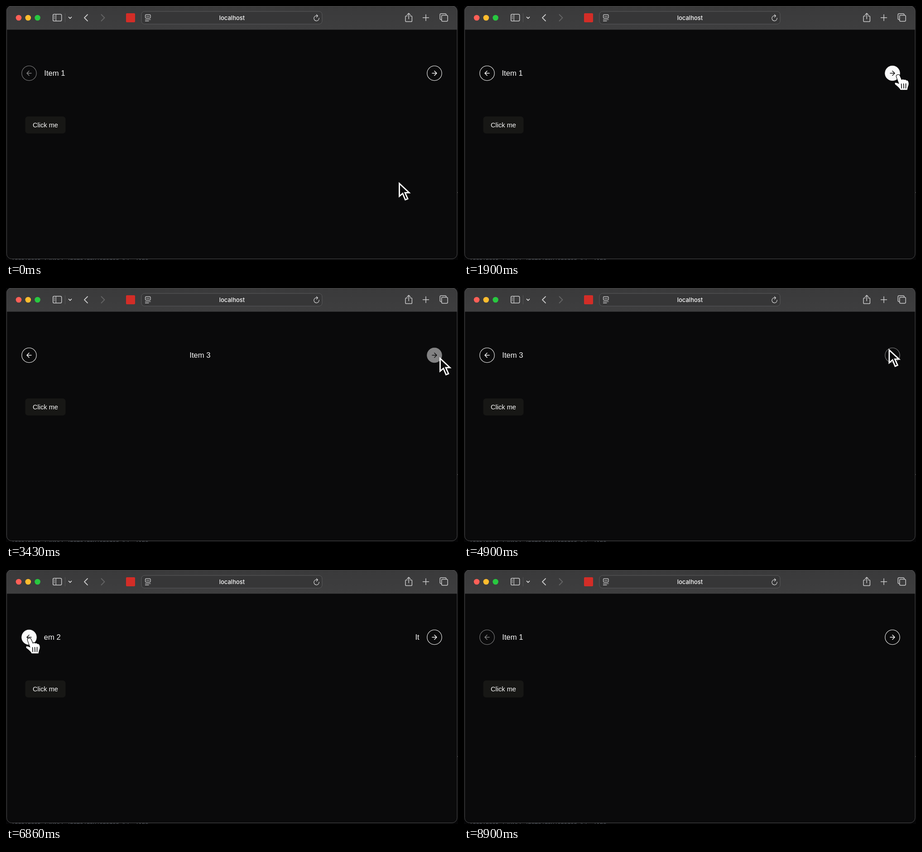
Write an HTML page that moves like this. It is 998 px wide and 561 px high and loops after 10 s.

```html
<!DOCTYPE html>
<html lang="en">
<head>
<meta charset="utf-8">
<title>Carousel</title>
<style>
  html, body { margin: 0; width: 100%; height: 100%; overflow: hidden; background: #050506; }
  svg { display: block; width: 998px; height: 561px; }
  text { font-family: "Liberation Sans", Arial, sans-serif; fill: #fafafa; }
  .icon { fill: none; stroke: #c9c9ca; stroke-width: 1.5; stroke-linecap: round; stroke-linejoin: round; }
  .item { font-size: 16.67px; }
</style>
</head>
<body>
<svg viewBox="0 0 998 561">
  <defs>
    <linearGradient id="bar" x2="0" y2="1">
      <stop stop-color="#3a3a3b"/><stop offset="1" stop-color="#3e3e3f"/>
    </linearGradient>
    <clipPath id="window"><rect x="1" y="-.5" width="995.5" height="559" rx="11"/></clipPath>
    <clipPath id="viewport"><rect x="84" y="130" width="829" height="40"/></clipPath>
  </defs>

  <!-- desktop behind the window -->
  <text x="12" y="566" font-size="12" style="font-family:'Liberation Mono',monospace;fill:#4b5058">localhost (2015) /home/dev/shader-12, line</text>
  <rect x="996.5" y="411" width="1.5" height="2" fill="#444"/>

  <g clip-path="url(#window)">
    <rect width="998" height="561" fill="#0a0a0b"/>
    <rect width="998" height="52.5" fill="url(#bar)"/>
    <rect y="52" width="998" height="1" fill="#1b1b1c"/>
  </g>
  <rect x="1.5" y="0" width="994.5" height="558.5" rx="11" fill="none" stroke="#4c4c4d"/>

  <!-- toolbar -->
  <circle cx="28" cy="26" r="6.3" fill="#ff5f57"/>
  <circle cx="48.8" cy="26" r="6.3" fill="#febc2e"/>
  <circle cx="69.6" cy="26" r="6.3" fill="#28c840"/>
  <path d="M130.5 16v20" stroke="#545455"/>
  <rect x="265" y="16" width="20" height="20" rx="2" fill="#d32d27"/>
  <rect x="299" y="12" width="399" height="28" rx="7" fill="#363637" stroke="#5b5b5c"/>
  <g class="icon">
    <rect x="103.7" y="18.2" width="19" height="15" rx="2.5"/>
    <path d="M110.3 18.5v15M106 22h2M106 25h2M106 28h2" stroke-width="1.2"/>
    <path d="M138.5 24.5l3 3 3-3" stroke="#e4e4e5" stroke-width="1.7"/>
    <path d="M180 19l-7 7 7 7" stroke-width="1.8"/>
    <path d="M210.5 19l7 7-7 7" stroke="#656566" stroke-width="1.8"/>
    <g stroke="#d8d8d9" stroke-width="1.2">
      <rect x="307.6" y="19.2" width="11.4" height="7.6" rx="1.8"/>
      <path d="M310 23h6.6M307.5 30h11.5M307.5 33.2h7.5"/>
      <path d="M688 22a5.7 5.7 0 1 0 3.2 4.6M685.5 18.8l3 3-3 3"/>
    </g>
    <path d="M886 22h-2.2q-1.8 0-1.8 1.8v9q0 1.8 1.8 1.8h10.8q1.8 0 1.8-1.8v-9q0-1.8-1.8-1.8h-2.2M889.2 28.5v-12M885.7 19.5l3.5-3.5 3.5 3.5"/>
    <path d="M920.5 25.7h13M927 19v13.4"/>
    <path d="M961.5 30h-1.2q-2 0-2-2v-9q0-2 2-2h9.5q2 0 2 2v1.3"/>
    <rect x="961.7" y="20.5" width="13.5" height="13.3" rx="2.2"/>
  </g>
  <text x="499" y="31.2" text-anchor="middle" font-size="13" font-weight="500" style="font-family:Inter,sans-serif">localhost</text>

  <!-- page -->
  <g id="items" clip-path="url(#viewport)"></g>
  <rect x="42.5" y="244" width="89" height="37.5" rx="6" fill="#171715"/>
  <text x="59" y="268.2" font-size="14.6">Click me</text>
  <g id="prev" transform="translate(51 148.5)">
    <circle r="16.2" stroke="#fafafa" stroke-width="1.1"/>
    <path class="icon" d="M5 0h-10M0-5l-5 5 5 5"/>
  </g>
  <g id="next" transform="translate(946 148.5)">
    <circle r="16.2" stroke="#fafafa" stroke-width="1.1"/>
    <path class="icon" d="M-5 0h10M0-5l5 5-5 5"/>
  </g>

  <g id="cursor">
    <path id="arrow" d="M1.5 4V32.3L8.8 26 14.6 40 20 37.7 14 24.3H23.2Z" fill="#0a0a0b" stroke="#fff" stroke-width="2.8"/>
    <g id="hand">
      <path d="M-.6 .4C2-1 4.4 0 5.6 2.6L9.4 11Q12 8.6 14.6 11Q17.4 9.6 19.6 12.4Q23 11.6 24.4 15.2Q26.6 21 23.4 27.4L22 34.4H6.4Q4.6 29.4-4.8 22.6Q-7.4 19.4-5 17.6Q-3 16.6 2.8 19.6L-2.4 5.4Q-3.6 2-.6 .4Z" fill="#fff" stroke="#000" stroke-width="1.1"/>
      <path d="M8.6 20.5l.6 9.5M13.6 20.3l.4 9.7M18.6 20l-.1 10" stroke="#111" stroke-width="1.7" stroke-linecap="round"/>
    </g>
  </g>
</svg>
<script>
const LOOP = 10000, SLIDE = 829, LEFT = 84.3;
const clicks = { toSecond: 1900, toThird: 3240, backToSecond: 6200, backToFirst: 7225 };
const $ = id => document.getElementById(id);

// time, x, y of the pointer tip
const path = [
  [660, 867, 388], [760, 885, 340], [900, 940, 210], [1010, 968, 133], [1130, 968, 151],
  [1330, 968, 151], [1660, 957, 151.5],
  [4750, 957, 151.5], [4840, 971, 125], [4900, 951.5, 133.5], [4960, 104, 98],
  [5060, 104, 98], [5160, 40, 17], [5260, 11, 60], [5400, 75, 135],
  [5600, 75, 135], [5660, 65, 140], [5960, 65, 140], [6050, 50, 150.5],
  [7270, 50, 150.5], [7430, 227, 86], [7560, 600, -50]
];

const items = [1, 2, 3].map(n => {
  const text = document.createElementNS("http://www.w3.org/2000/svg", "text");
  text.setAttribute("class", "item");
  text.setAttribute("y", 154);
  text.textContent = "Item " + n;
  $("items").append(text);
  return text;
});

const ramp = (t, start, length) => Math.min(1, Math.max(0, (t - start) / length));
const ease = p => p * p * (3 - 2 * p);
const hover = (t, enter, leave) => ease(ramp(t, enter, 150)) - ease(ramp(t, leave, 150));

// Step response of the carousel's friction scroller at 60 steps a second
function slide(t, start) {
  if (t <= start) return 0;
  const n = (t - start) * 0.06;
  return 1 - 1.848 * 0.8807 ** n + 0.848 * 0.7721 ** n;
}

function pointerAt(t) {
  const i = path.findIndex(p => p[0] > t);
  if (i === 0) return path[0].slice(1);
  if (i < 0) return path[path.length - 1].slice(1);
  const [t0, x0, y0] = path[i - 1], [t1, x1, y1] = path[i];
  const p = (t - t0) / (t1 - t0);
  return [x0 + (x1 - x0) * p, y0 + (y1 - y0) * p];
}

function drawButton(id, enabled, glow) {
  const [circle, icon] = $(id).children;
  const shade = 250 - 235 * glow;
  $(id).setAttribute("opacity", enabled ? 1 : 0.5);
  circle.setAttribute("fill", `rgba(250,250,250,${glow})`);
  icon.style.stroke = `rgb(${shade},${shade},${shade})`;
}

function draw(t) {
  const { toSecond, toThird, backToSecond, backToFirst } = clicks;
  const position = slide(t, toSecond) + slide(t, toThird) - slide(t, backToSecond) - slide(t, backToFirst);
  items.forEach((text, i) => text.setAttribute("x", LEFT + SLIDE * (i - position)));

  drawButton("prev", t >= toSecond && t < backToFirst, hover(t, 5980, 7285));
  drawButton("next", t < toThird || t >= backToSecond, hover(t, 1390, 4750));

  const pointing = (t >= 1400 && t < toThird) || (t >= 5990 && t < backToFirst);
  $("cursor").setAttribute("transform", `translate(${pointerAt(t)})`);
  $("hand").style.display = pointing ? "" : "none";
  $("arrow").style.display = pointing ? "none" : "";
}

function frame() {
  draw(performance.now() % LOOP);
  requestAnimationFrame(frame);
}
frame();
</script>
</body>
</html>
```
